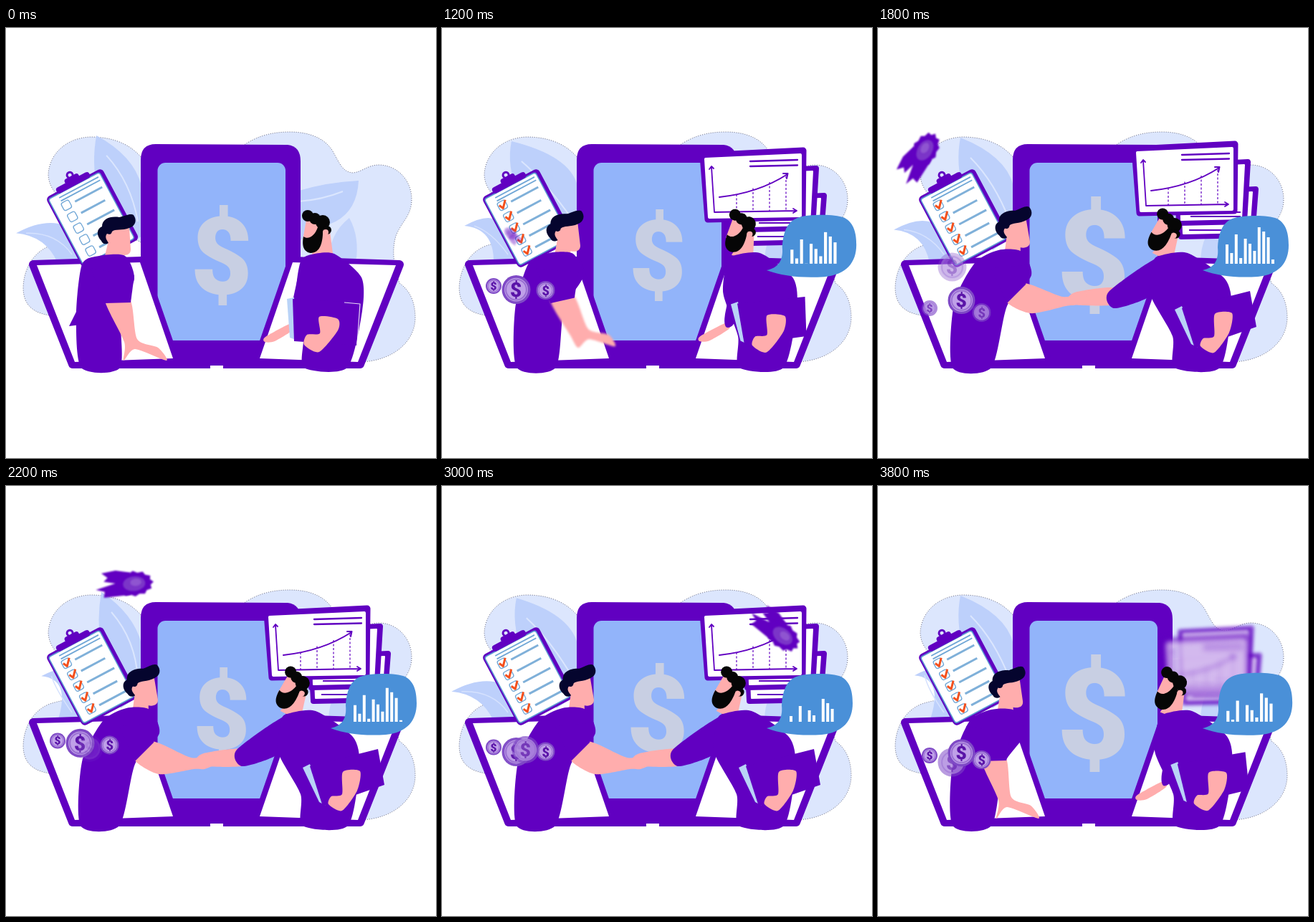
These frames come from a looping animation (600x600 px, 4 s). An HTML page with a canvas:

```html
<!DOCTYPE html>
<html lang="en">
<head>
<meta charset="utf-8">
<title>Business deal</title>
<style>
html, body { margin: 0; width: 100%; height: 100%; overflow: hidden; background: #fff; }
canvas { display: block; width: 600px; height: 600px; }
</style>
</head>
<body>
<canvas id="stage" width="600" height="600"></canvas>
<script>
const ctx = document.getElementById('stage').getContext('2d');
const LOOP = 4000, STEP = 200;
const PURPLE = '#6100c1', SKIN = '#ffadad', BLOB = '#dce6fd', LEAF = '#bdd0fb', INK = '#060606';
const TAU = Math.PI * 2, DEG = Math.PI / 180;
const CASH_FONT = 'Roboto, sans-serif';

const lerp = (a, b, k) => a + (b - a) * k;
const morph = ([a, b], k) => a.map((p, i) => [lerp(p[0], b[i][0], k), lerp(p[1], b[i][1], k)]);
const shift = (pts, dx, dy) => pts.map(p => [p[0] + dx, p[1] + dy]);

function ramp(t, from, to) {
  const u = Math.min(1, Math.max(0, (t - from) / (to - from)));
  return u * u * (3 - 2 * u);
}

// Rises, holds, falls
const pulse = (t, a, b, c, d) => ramp(t, a, b) * (1 - ramp(t, c, d));

// One skewed beat per second: quick fall, slow rise
const beat = t => 0.5 + 0.5 * Math.cos(TAU * ((t + 200) % 1000 / 1000 || 1) ** 0.72);

function bezier(p, u) {
  const v = 1 - u;
  return v * v * v * p[0] + 3 * v * v * u * p[1] + 3 * v * u * u * p[2] + u * u * u * p[3];
}

function slope(p, u) {
  const v = 1 - u;
  return v * v * (p[1] - p[0]) + 2 * v * u * (p[2] - p[1]) + u * u * (p[3] - p[2]);
}

function fill(d, color) {
  ctx.fillStyle = color;
  ctx.fill(new Path2D(d));
}

function line(d, color, width) {
  ctx.strokeStyle = color;
  ctx.lineWidth = width;
  ctx.stroke(new Path2D(d));
}

function poly(pts, color, edge) {
  ctx.beginPath();
  pts.forEach(p => ctx.lineTo(p[0], p[1]));
  ctx.closePath();
  ctx.fillStyle = color;
  ctx.fill();
  if (edge) {
    ctx.strokeStyle = color;
    ctx.lineWidth = edge;
    ctx.stroke();
  }
}

// Closed smooth curve through the points
function soft(pts, color) {
  const n = pts.length, at = i => pts[(i + n) % n], k = 1 / 8;
  ctx.beginPath();
  ctx.moveTo(...pts[0]);
  for (let i = 0; i < n; i++) {
    const [o, p, q, r] = [at(i - 1), at(i), at(i + 1), at(i + 2)];
    ctx.bezierCurveTo(p[0] + (q[0] - o[0]) * k, p[1] + (q[1] - o[1]) * k,
      q[0] - (r[0] - p[0]) * k, q[1] - (r[1] - p[1]) * k, q[0], q[1]);
  }
  ctx.fillStyle = color;
  ctx.fill();
}

function dot(x, y, r, color) {
  ctx.beginPath();
  ctx.arc(x, y, r, 0, TAU);
  ctx.fillStyle = color;
  ctx.fill();
}

function ring(x, y, r, color, width) {
  ctx.beginPath();
  ctx.arc(x, y, r, 0, TAU);
  ctx.strokeStyle = color;
  ctx.lineWidth = width;
  ctx.stroke();
}

function box(x, y, w, h, r, color) {
  ctx.beginPath();
  ctx.roundRect(x, y, w, h, r);
  ctx.fillStyle = color;
  ctx.fill();
}

function group(draw) {
  ctx.save();
  draw();
  ctx.restore();
}

// Turn and move about a pivot
function pose(px, py, dx, dy, turn, draw) {
  group(() => {
    ctx.translate(px + dx, py + dy);
    ctx.rotate(turn * DEG);
    ctx.translate(-px, -py);
    draw();
  });
}

// Dollar sign of a given ink height, centred on x, y
function cash(x, y, h, color) {
  ctx.font = `900 100px ${CASH_FONT}`;
  let m = ctx.measureText('$');
  const size = 100 * h / (m.actualBoundingBoxAscent + m.actualBoundingBoxDescent);
  ctx.font = `900 ${size}px ${CASH_FONT}`;
  m = ctx.measureText('$');
  ctx.fillStyle = color;
  ctx.fillText('$', x - (m.actualBoundingBoxRight - m.actualBoundingBoxLeft) / 2,
    y + (m.actualBoundingBoxAscent - m.actualBoundingBoxDescent) / 2);
}

const BLOBS = [
  'M190 182 C172 160 146 152 118 152 C84 153 60 176 59 205 C60 224 72 236 90 246 L190 300 Z',
  'M110 296 C92 298 82 298 68 302 C42 308 25 332 24 362 C24 390 42 400 70 402 L130 400 Z',
  'M328 166 C350 150 372 145 396 145 C425 145 446 155 456 172 C466 190 470 201 484 202 C497 201 504 191 521 191 C548 192 566 214 566 239 C566 262 552 270 544 290 C538 310 541 332 549 356 C566 368 571 386 571 405 C570 440 538 464 496 466 L380 440 Z'
];

function backdrop(t) {
  for (const d of BLOBS) {
    fill(d, BLOB);
    ctx.setLineDash([1, 2]);
    line(d, 'rgba(20,20,50,.8)', 0.8);
    ctx.setLineDash([]);
  }
  const x = 115 + 19 * Math.cos(TAU * (t - 300) / 2000), y = 148 + (133 - x) * 0.28;
  fill(`M${x} ${y} Q${x - 14} 225 160 310 L190 290 L189 220 Q178 178 ${x} ${y}Z`, LEAF);
  line(`M${x + 14} ${y + 28} Q${x + 48} 215 184 270`, '#dbe6fe', 2);
  const sx = 32 - 19 * Math.cos(TAU * (t - 80) / 1480), sy = 287 - (sx - 13) * 0.6;
  fill(`M${sx} ${sy} Q${sx + 40} ${sy - 22} 84 276 L115 330 L72 328 Q${sx + 42} ${sy + 4} ${sx} ${sy}Z`, LEAF);
  line(`M${sx + 14} ${sy} Q70 285 92 316`, '#d6e2fe', 1.5);
  const sway = 3 * Math.sin(TAU * t / 2000);
  fill(`M405 228 Q448 215 ${492 + sway} 213 Q490 254 460 270 Q430 282 405 300Z`, LEAF);
  line('M408 242 Q440 240 470 228', '#dbe6fe', 2);
  fill(`M${479 + sway} 265 Q494 292 488 328 L450 328 Q450 288 ${479 + sway} 265Z`, '#c3d4fb');
}

function halfLaptop() {
  poly([[38, 330], [188, 325], [238, 469], [93, 469]], PURPLE, 12);
  poly([[43, 331], [187, 327], [233, 461], [96, 466]], '#fff');
}

function devices(t) {
  fill('M188 184 Q188 162 209 162 L393 163 Q411 165 411 186 L411 472 L188 472Z', PURPLE);
  box(211.5, 188, 178.5, 248, [11, 11, 2, 2], '#92b4fa');
  cash(301, 317, 128 + 36 * beat(t), '#c8cfe3');
  halfLaptop();
  group(() => { ctx.translate(587, 0); ctx.scale(-1, 1); halfLaptop(); });
  box(236, 461, 115, 14, 0, PURPLE);
  box(285, 471, 18, 5, 0, '#fff');
}

function clipboard(t) {
  const ticks = Math.min(5, Math.floor(t / 120));
  group(() => {
    ctx.translate(55, 237);
    ctx.rotate(-28 * DEG);
    box(0, 0, 89, 112, 6, PURPLE);
    box(2, 3, 82, 106, 4, '#5c9bd2');
    box(3.5, 4.5, 79, 103, 3, '#fff');
    box(18, -5, 52, 9, 4, PURPLE);
    box(34, -10, 22, 9, 4, PURPLE);
    ring(45, -12, 4, PURPLE, 3);
    line('M17 9H79M17 14H79', '#6fa6d6', 1.8);
    for (let i = 0; i < 5; i++) {
      const y = 23 + 18 * i;
      ctx.beginPath();
      ctx.roundRect(15, y - 6, 12, 12, 3);
      ctx.strokeStyle = '#6fa6d6';
      ctx.lineWidth = 1.3;
      ctx.stroke();
      line(`M34 ${y + 1}H${i % 2 ? 72 : 77}`, '#7fb0d9', 3);
      if (i < ticks) line(`M17 ${y - 2}L20 ${y + 4}L28 ${y - 5}`, '#f4511e', 3);
    }
  });
}

function sheet(x, y, w, h) {
  poly([[x, y + 5], [x + w, y], [x + w - 5, y + h], [x + 3, y + h + 2]], PURPLE, 8);
  poly([[x + 4, y + 8], [x + w - 5, y + 4], [x + w - 9, y + h - 4], [x + 6, y + h - 2]], '#fff', 2);
}

function chart() {
  poly([[364, 178], [504, 171], [503, 264], [371, 267]], PURPLE, 9);
  poly([[368, 183], [500, 177], [500, 262], [373, 264]], '#fff', 4);
  ctx.lineCap = 'round';
  line('M430 186L496 184M430 193L496 191.5', PURPLE, 2.3);
  line('M376 194L380 257L494 255M373 197L376 193L379 196M490 252L495 255L490 258', PURPLE, 1.8);
  line('M387 236Q442 230 482 204M476 203L482.5 203L481 210', PURPLE, 2);
  ctx.lineCap = 'butt';
  ctx.setLineDash([3, 2.5]);
  for (let i = 0; i < 4; i++) line(`M${411 + 23 * i} ${232 - 8.5 * i}V256`, PURPLE, 1.2);
}

function cards(t) {
  const c = pulse(t, 450, 900, 3550, 4050), k = 1 - c, bob = beat(t) ** 6 * c;
  if (!c) return;
  group(() => {
    ctx.globalAlpha = Math.min(1, c * 1.25);
    if (k > 0.08) ctx.filter = `blur(${k * 4}px)`;
    ctx.translate(4 * k - 6 * bob, 14 * k - 9 * bob);
    sheet(426, 234, 107, 64);
    line('M440 291H488M498 291H520', PURPLE, 2);
    sheet(423, 196, 99, 83);
    line('M442 272H512M470 266H512', PURPLE, 2);
    ctx.translate(434 + 50 * k, 219 + 56 * k);
    ctx.scale(1 - 0.36 * k, 1 - 0.36 * k);
    ctx.translate(-434, -219);
    if (k > 0.08) ctx.filter = `blur(${k * 7}px)`;
    chart();
  });
}

// Each part: standing outline, then leaning or reaching outline
const LEFT = {
  body: [
    [[130, 318], [166, 318], [179, 350], [160, 396], [159, 474], [105, 474], [98, 400], [106, 330]],
    [[168, 310], [200, 312], [214, 345], [180, 388], [158, 474], [104, 474], [106, 385], [135, 328]]
  ],
  sleeve: [
    [[118, 335], [138, 384], [174, 383], [179, 345]],
    [[158, 335], [180, 384], [206, 358], [212, 330]]
  ],
  arm: [
    [[138, 379], [165, 438], [164, 464], [180, 448], [224, 464], [212, 446], [183, 434], [173, 379]],
    [[179, 381], [213, 402], [262, 395], [277, 395], [291, 388], [288, 376], [258, 379], [203, 356]]
  ]
};

function leftMan(lean, reach, dy) {
  const low = (1 - reach) * lean * 7;
  if (lean < 0.3) fill('M98 396L88 416L104 414Z', PURPLE);
  pose(155, 280, 35 * lean, -9 * lean, -6 * lean, () => {
    fill('M147 282L172 278L174 309C174 317 166 318 160 316L159 329L137 322L142 301C136 296 137 286 143 287Z', SKIN);
    fill('M133 297C126 290 126 280 134 277C134 266 146 262 158 264C166 262 174 258 178 261C183 268 181 276 172 279C162 283 152 280 148 284C147 289 143 288 141 287C137 292 141 296 143 300C138 303 134 300 133 297Z', '#05052e');
  });
  const arm = morph(LEFT.arm, reach).map(([x, y], i, all) => {
    const w = Math.sin(Math.PI * i / (all.length - 1));
    return [x + low * (1 - w), y + dy * w];
  });
  soft(morph(LEFT.body, lean), PURPLE);
  group(() => {
    const speed = reach * (1 - reach);
    if (speed > 0.02) ctx.filter = `blur(${8 * speed}px)`;
    soft(arm, SKIN);
  });
  poly(shift(morph(LEFT.sleeve, reach), low, 0), PURPLE);
}

const RIGHT = {
  body: [
    [[426, 316], [458, 315], [496, 348], [497, 395], [476, 474], [416, 474], [415, 430], [405, 370], [411, 326]],
    [[392, 318], [432, 314], [484, 350], [493, 390], [477, 474], [414, 474], [411, 430], [380, 372], [384, 328]]
  ],
  folder: [
    [[400, 378], [494, 383], [489, 443], [402, 437]],
    [[424, 391], [519, 367], [528, 417], [442, 447]]
  ],
  paper: [
    [[392, 378], [402, 376], [404, 435], [396, 432]],
    [[414, 393], [424, 388], [446, 446], [437, 441]]
  ],
  fore: [
    [[437, 403], [463, 406], [463, 422], [437, 452], [416, 442], [420, 428], [438, 426]],
    [[470, 399], [494, 398], [490, 425], [469, 453], [450, 444], [454, 433], [469, 430]]
  ],
  sleeve: [
    [[410, 338], [396, 402], [398, 418], [408, 412], [412, 370]],
    [[392, 320], [322, 368], [329, 391], [375, 377], [402, 350]]
  ],
  hand: [
    [[398, 412], [362, 431], [361, 438], [375, 437], [402, 420]],
    [[328, 367], [276, 373], [264, 384], [278, 391], [333, 390]]
  ]
};

function rightMan(lean, reach, dy) {
  const r = reach ** 3, speed = r * (1 - r);
  group(() => {
    if (speed > 0.02) ctx.filter = `blur(${6 * speed}px)`;
    soft(shift(morph(RIGHT.hand, r), 0, dy * 0.5), SKIN);
    soft(morph(RIGHT.sleeve, r), PURPLE);
  });
  pose(440, 262, -25 * lean, 4 * lean, 20 * lean, () => {
    fill('M437 280L452 284L457 322L426 318L431 305Z', SKIN);
    fill('M419 268L440 270L438 288L428 296L414 296Z', SKIN);
    dot(421, 262, 8, INK);
    dot(431, 266, 8, INK);
    dot(442, 271, 10, INK);
    dot(448, 282, 6, INK);
    fill('M415 291C422 296 431 290 435 278L442 278C443 300 438 314 425 314C414 312 413 302 415 291Z', INK);
    dot(446, 285, 4, SKIN);
  });
  soft(morph(RIGHT.body, lean), PURPLE);
  poly(morph(RIGHT.paper, lean), '#b9d3f7');
  poly(morph(RIGHT.folder, lean), PURPLE);
  if (lean < 0.3) line('M472 383L494 385L490 441', 'rgba(255,255,255,.85)', 1.2);
  soft(morph(RIGHT.fore, lean), SKIN);
}

const BARS = [7, -5, 21, -12, 15, 8, -2, 31, 25, 17, -14];

function bubble(t) {
  const s = pulse(t, 1000, 1200, 3900, 4000) * (1.045 - 0.045 * pulse(t, 1200, 1400, 3600, 3800));
  if (!s) return;
  const rise = 10 + 10 * Math.cos(TAU * (t - 1800) / 2800);
  group(() => {
    ctx.translate(458, 337);
    ctx.scale(s, lerp(s, 1, 0.6));
    ctx.translate(-458, -337);
    fill('M453 338C468 335 476 325 474 306C476 276 486 265 508 263C528 261 546 262 557 266C570 273 573 288 573 303C573 327 560 344 530 347C500 349 474 346 453 338Z', '#4a90d8');
    BARS.forEach((b, i) => {
      const h = Math.max(0, b + rise);
      box(485 + 6.4 * i, 329 - h, 4, h, 0, '#fff');
    });
  });
}

const COIN_LIFE = 930;
const COINS = [
  { x: 72, r: 11, start: 780, y: 402, climb: 60 },
  { x: 103.5, r: 20, start: 950, y: 393, climb: 60 },
  { x: 144.5, r: 13, start: 780, y: 408, climb: 60 },
  { x: 116.5, r: 19, start: 1300, y: 432, climb: 66 }
];

function coins(t) {
  for (const { x, r, start, y, climb } of COINS) {
    if (t < start) continue;
    const u = (t - start) % COIN_LIFE / COIN_LIFE;
    group(() => {
      ctx.globalAlpha = Math.min(1, 0.35 + u * 3, (1 - u) * 4);
      ctx.translate(x, y - climb * (1 - (1 - u) ** 2));
      dot(0, 0, r, '#7f4ac6');
      dot(0, 0, r * 0.82, '#bfa0e8');
      ring(0, 0, r * 0.72, '#9a70d2', r * 0.1);
      cash(0, 0, r * 1.3, '#5a14a8');
    });
  }
}

const FLIGHT_X = [99, -146, 611, 476], FLIGHT_Y = [291, 50, 118, 287];

function badge(t) {
  const show = pulse(t, 1050, 1400, 3300, 3650);
  if (!show) return;
  const u = Math.min(1, Math.max(0, (t - 1400) / 2000));
  group(() => {
    ctx.globalAlpha = show;
    ctx.filter = 'blur(0.8px)';
    ctx.translate(bezier(FLIGHT_X, u), bezier(FLIGHT_Y, u));
    ctx.rotate(Math.atan2(slope(FLIGHT_Y, u), slope(FLIGHT_X, u)));
    ctx.scale(show, show);
    fill('M10 -15L-10 -20L-30 -18L-22 -11L-28 -6L-12 -2L-40 4L-28 8L-30 16L8 16Z', PURPLE);
    ctx.translate(14, 1);
    ctx.scale(1.3, 0.85);
    const star = Array.from({ length: 24 }, (_, i) => {
      const r = i % 2 ? 18 : 21, a = i * TAU / 24;
      return [r * Math.cos(a), r * Math.sin(a)];
    });
    poly(star, PURPLE);
    dot(0, 0, 12, '#7b35c8');
    dot(2, -2, 6, '#8f55d0');
  });
}

function draw(now) {
  const t = Math.floor(now % LOOP / STEP) * STEP;
  const lean = pulse(t, 700, 1700, 3300, 4800);
  const reach = pulse(t, 1050, 1500, 3300, 3700);
  const dy = -9 * beat(t) ** 6 * reach;
  ctx.clearRect(0, 0, 600, 600);
  ctx.lineJoin = 'round';
  backdrop(t);
  devices(t);
  clipboard(t);
  cards(t);
  rightMan(lean, reach, dy);
  leftMan(lean, reach, dy);
  badge(t);
  bubble(t);
  coins(t);
}

let begin;
function tick(now) {
  begin ??= now;
  draw(now - begin);
  requestAnimationFrame(tick);
}
draw(0);
requestAnimationFrame(tick);
</script>
</body>
</html>
```
